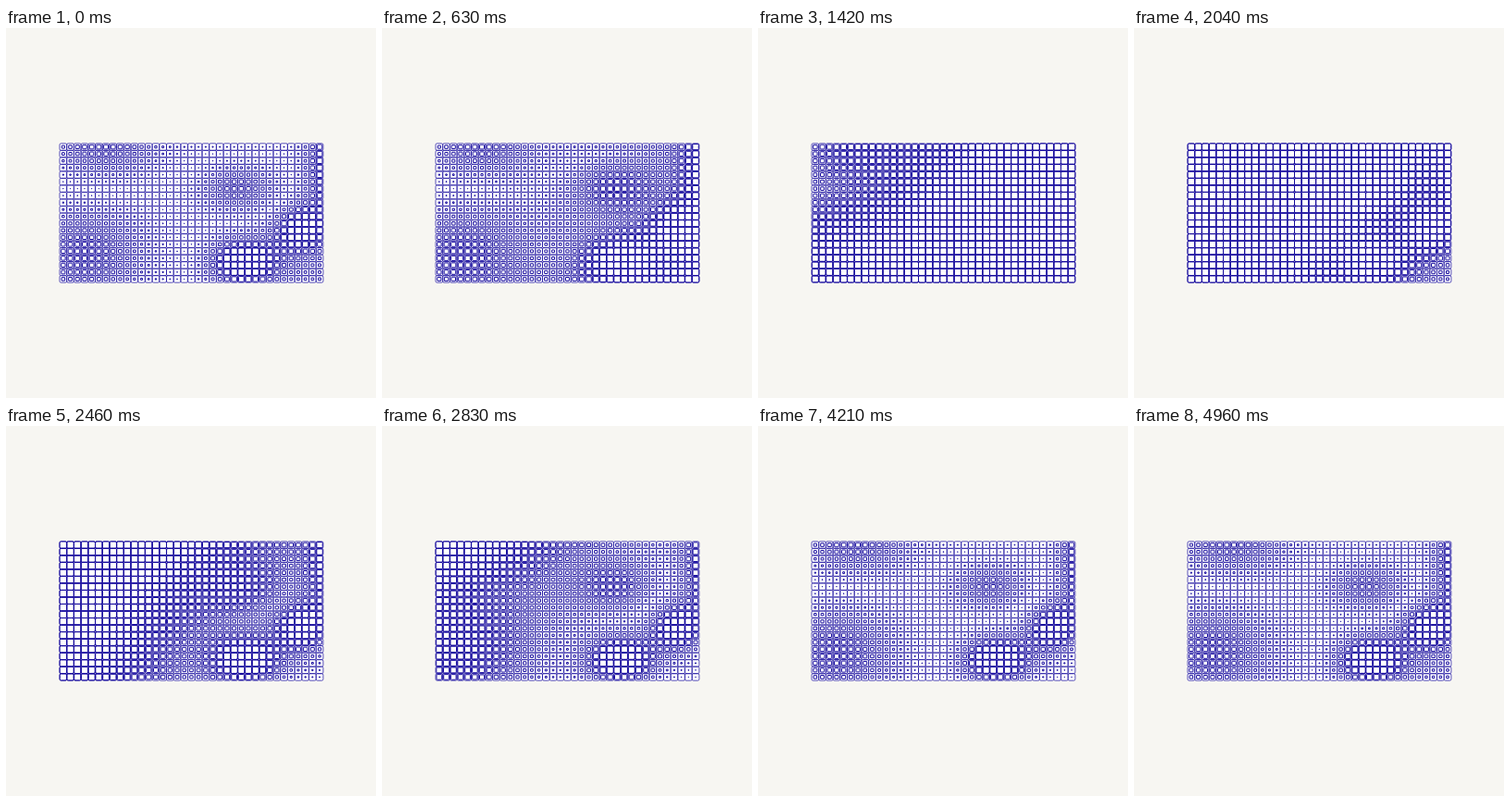
These frames come from a looping animation (400x400 px, 5 s). An HTML page with a canvas:

```html
<!DOCTYPE html>
<html lang="en">
<head>
<meta charset="utf-8">
<title>Grid wave</title>
<style>
html, body { margin: 0; width: 100%; height: 100%; overflow: hidden; background: #f7f6f2; }
canvas { display: block; width: 400px; height: 400px; }
</style>
</head>
<body>
<canvas id="stage" width="400" height="400"></canvas>
<script>
const ctx = document.getElementById('stage').getContext('2d');
const LOOP = 5000, COLS = 37, ROWS = 20;
const LEFT = 58, TOP = 124.8, CELL_W = 7.7, CELL_H = 7.52;

// Smooth hill (or hollow, if negative) centred on x, y
const hill = (x, y, height, spreadX, spreadY) => (px, py) =>
  height * Math.exp(-(((px - x) / spreadX) ** 2) - ((py - y) / spreadY) ** 2);

const hills = [
  hill(105, 122, 0.65, 65, 43),
  hill(85, 245, -0.66, 68, 55),
  hill(250, 173, -0.6, 42, 26),
  hill(250, 112, 0.3, 60, 20),
  hill(350, 150, 0.9, 26, 60),
  hill(318, 218, 1, 28, 26),
  hill(258, 253, 1.2, 38, 26)
];

const cells = [];
for (let r = 0; r < ROWS; r++) {
  for (let c = 0; c < COLS; c++) {
    const x = LEFT + (c + 0.5) * CELL_W, y = TOP + (r + 0.5) * CELL_H;
    const height = hills.reduce((sum, h) => sum + h(x, y), 0);
    const away = (COLS - 1 - c) * CELL_W + (ROWS - 1 - r) * CELL_H;
    cells.push({ x, y, rest: Math.min(0.9, Math.abs(height)), peak: 1020 + 3.5 * away });
  }
}

function addBox({ x, y }, scale) {
  const w = CELL_W * scale, h = CELL_H * scale;
  ctx.roundRect(x - w / 2, y - h / 2, w, h, 1.5 * scale * scale);
}

// The wave runs from the bottom right corner and opens each square fully.
function scaleAt(cell, time) {
  const angle = 2 * Math.PI * (time - cell.peak) / LOOP;
  const wave = Math.min(1, 1.15 * ((1 + Math.cos(angle)) / 2) ** 2.7);
  return Math.max(0.06, cell.rest + (1 - cell.rest) * wave);
}

function draw(time) {
  ctx.fillStyle = '#f7f6f2';
  ctx.fillRect(0, 0, 400, 400);
  ctx.strokeStyle = '#14089c';

  ctx.beginPath();
  for (const cell of cells) addBox(cell, 1);
  ctx.fillStyle = '#fff';
  ctx.fill();
  ctx.lineWidth = 0.7;
  ctx.stroke();

  ctx.lineWidth = 1;
  for (const cell of cells) {
    ctx.beginPath();
    addBox(cell, scaleAt(cell, time));
    ctx.stroke();
  }
}

function tick() {
  draw(performance.now() % LOOP);
  requestAnimationFrame(tick);
}
tick();
</script>
</body>
</html>
```
